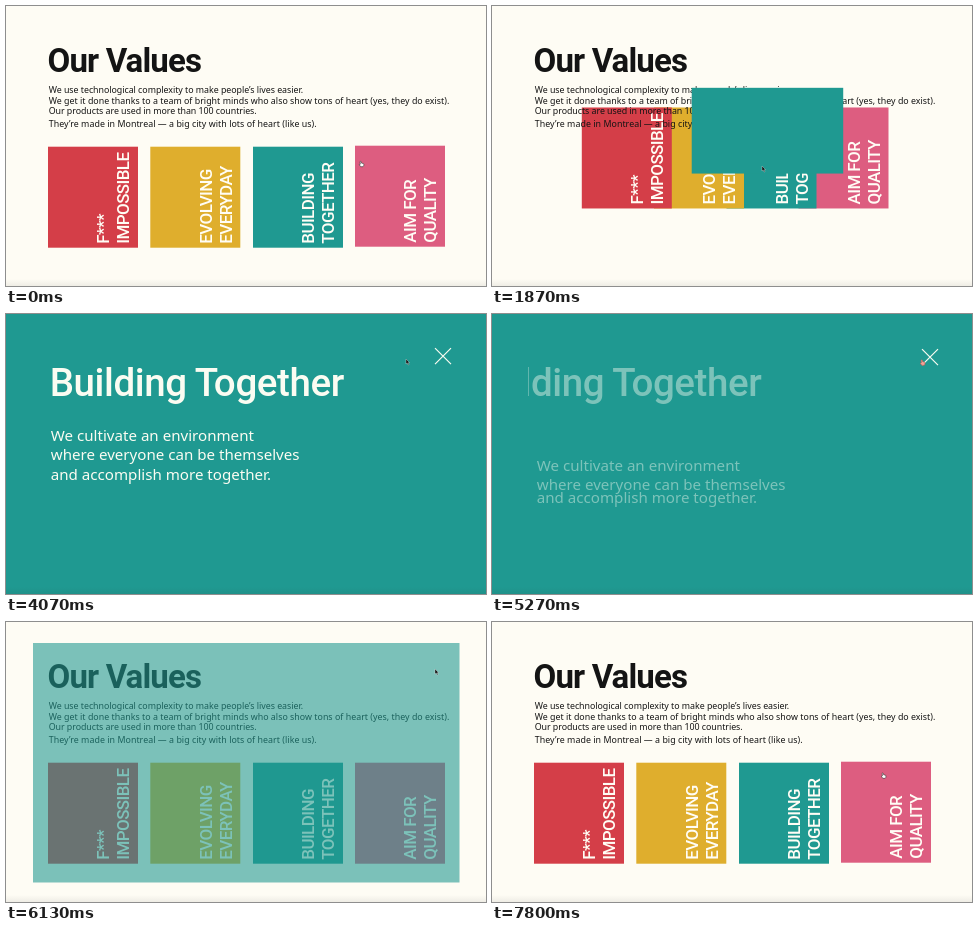
These frames come from a looping animation (480x280 px, 7870 ms). An HTML page:

```html
<!DOCTYPE html>
<html lang="en">
<head>
<meta charset="utf-8">
<title>Our Values</title>
<style>
  html, body { margin: 0; width: 100%; height: 100%; overflow: hidden; background: #fefcf4; }
  svg { display: block; width: 100%; height: 100%; }
  .head { font-family: Roboto, "Open Sans", sans-serif; font-weight: 500; }
  .body { font-family: "Noto Sans", "Open Sans", sans-serif; }
  .title { font-size: 33px; font-weight: 600; letter-spacing: -.85px; }
  .intro { font-size: 8.85px; }
  .label { font-size: 17px; letter-spacing: -.6px; fill: #fffdf5; }
  .detail { fill: #fbfcf2; }
  .detail .head { font-size: 38.5px; letter-spacing: -.4px; }
  .detail .body { font-size: 15.12px; }
</style>
</head>
<body>
<svg viewBox="0 0 480 280" id="stage">
  <defs>
    <linearGradient id="shade" x1="0" y1="0" x2="0" y2="1">
      <stop offset="0" stop-color="#222" stop-opacity="0"/>
      <stop offset="1" stop-color="#222" stop-opacity=".07"/>
    </linearGradient>
    <clipPath id="window"><rect x="36" y="30" width="420" height="220"/></clipPath>
  </defs>
  <rect width="480" height="280" fill="#fefcf4"/>
  <g id="values">
    <g id="tiles"></g>
    <g id="intro" fill="#141414">
      <text class="head title" x="41.5" y="66">Our Values</text>
    </g>
  </g>
  <rect id="pane" fill="#1f9991"/>
  <g id="detail" class="detail" clip-path="url(#window)">
    <text class="head" y="82">Building Together</text>
  </g>
  <path id="close" d="M-8-8 8 8M8-8-8 8" stroke="#fbfcf2" stroke-width="1.15" fill="none"/>
  <rect y="273" width="480" height="7" fill="url(#shade)"/>
  <path id="spinner" d="M5 4.5A6.5 6.5 0 1 1 4.5-4.7" fill="none" stroke="#12605c" stroke-width="1"/>
  <path id="arrow" d="M0 0V5L1.2 4 2.2 6 3 5.6 2.2 3.7H3.6Z" fill="#111" stroke="#eee" stroke-width=".35"/>
  <path id="hand" d="M-1.5-2.4Q-.8-3.2-.3-2.2L0-.9 2-.4Q2.6 0 2.2 1.8L1.5 2.7H-.8L-2.3.6-1.2.2Z"
        fill="#fff" stroke="#333" stroke-width=".6"/>
</svg>
<script>
const LOOP = 7870;
const $ = id => document.getElementById(id);
const clamp = x => Math.max(0, Math.min(1, x));
const ramp = (t, a, b) => clamp((t - a) / (b - a));
const mix = (a, b, p) => a + (b - a) * p;
const outSine = p => Math.sin(p * Math.PI / 2);
const smooth = p => p * p * (3 - 2 * p);

function add(parent, tag, attrs, text) {
  const el = document.createElementNS("http://www.w3.org/2000/svg", tag);
  for (const key in attrs) el.setAttribute(key, attrs[key]);
  if (text) el.textContent = text;
  parent.appendChild(el);
  return el;
}
const move = (el, x, y) => el.setAttribute("transform", `translate(${x} ${y})`);
const fade = (el, o) => el.setAttribute("opacity", o);
const show = (el, on) => el.setAttribute("visibility", on ? "visible" : "hidden");

const TILE = { y: 140.7, w: 90, h: 101 };
const tiles = [
  [42, "#d43e48", "F***", "IMPOSSIBLE"],
  [144.3, "#dfae2d", "EVOLVING", "EVERYDAY"],
  [247, "#1f9991", "BUILDING", "TOGETHER"],
  [349, "#dd5d80", "AIM FOR", "QUALITY"]
].map(([x, fill, ...words]) => {
  const el = add($("tiles"), "g", {});
  add(el, "rect", { width: TILE.w, height: TILE.h, fill });
  words.forEach((word, i) => add(el, "text",
    { class: "head label", transform: `translate(${61.3 + 20 * i} 97) rotate(-90)` }, word));
  return { x, el };
});
// Earlier tiles stack above later ones.
[...tiles].reverse().forEach(tile => $("tiles").appendChild(tile.el));

[
  [86.7, -.035, "We use technological complexity to make people’s lives easier."],
  [97.5, .018, "We get it done thanks to a team of bright minds who also show tons of heart (yes, they do exist)."],
  [108.4, -.045, "Our products are used in more than 100 countries."],
  [121.4, .04, "They’re made in Montreal — a big city with lots of heart (like us)."]
].forEach(([y, spacing, text]) =>
  add($("intro"), "text", { class: "body intro", x: 42.7, y, "letter-spacing": spacing }, text));

const heading = $("detail").querySelector("text");
const lines = [
  "We cultivate an environment",
  "where everyone can be themselves",
  "and accomplish more together."
].map(text => add($("detail"), "text", { class: "body" }, text));

// time, x, y
const pointerPath = [
  [0, 355.5, 158], [70, 353, 158], [400, 214, 178], [800, 292, 188], [1200, 285, 166],
  [1530, 271, 161], [2400, 271, 161], [2950, 262, 158], [3470, 300, 135],
  [4070, 401, 46], [4270, 404, 46], [4530, 431, 49], [6250, 430, 48],
  [6670, 215, 110], [6800, 150, 175], [7300, 300, 172], [7670, 388, 154], [7870, 393, 153.5]
];
function pointerAt(t) {
  const i = pointerPath.findIndex(p => p[0] > t);
  const [a, b] = [pointerPath[i - 1], pointerPath[i]];
  const p = smooth(ramp(t, a[0], b[0]));
  return [mix(a[1], b[1], p), mix(a[2], b[2], p)];
}

function drawTiles(t, px, py) {
  const gather = t < 5600 ? outSine(ramp(t, 1670, 2470)) : 0;
  const idle = t < 1670 || t > 6600;
  let hovered = false;
  for (const { x, el } of tiles) {
    const over = idle && px >= x && px <= x + TILE.w && py >= TILE.y && py <= TILE.y + TILE.h;
    hovered = hovered || over;
    move(el, x + .765 * (204.5 - x) * gather, TILE.y - 102 * gather - (over ? 1 : 0));
  }
  return hovered;
}

function paneBox(t) {
  if (t >= 5670) return [27, 21, 426.5, 239.5];
  if (t >= 2670) {
    const p = smooth(ramp(t, 2670, 2900));
    return [mix(60, 0, p), mix(21, 0, p), mix(394, 480, p), mix(223, 280, p)];
  }
  const s = outSine(ramp(t, 1670, 2470));
  const [w, h] = [394 * s, 223 * s];
  return [mix(287, 257, s) - w / 2, mix(119.8, 132.5, s) - h / 2, w, h];
}

function drawPane(t) {
  const [x, y, width, height] = paneBox(t);
  Object.entries({ x, y, width, height }).forEach(([k, v]) => $("pane").setAttribute(k, v));
  fade($("pane"), 1 - ramp(t, 5800, 6600));
}

function drawDetail(t) {
  const enter = ramp(t, 2900, 3500), leave = ramp(t, 5000, 5550);
  const away = Math.pow(1 - enter, 2) + Math.pow(leave, 1.5);
  move(heading, 43.7 - 198 * away, 0);
  lines.forEach((line, i) => move(line, 44.8, 127.3 + 19.1 * i + (i < 2 ? 87 : 67) * away));
  fade($("detail"), enter * clamp(1 - 1.16 * leave));
  const lift = ramp(t, 4400, 4530);
  move($("close"), 437 + lift, 42.2 + lift);
  fade($("close"), t < 5670 ? ramp(t, 2900, 3300) : 0);
}

function drawPointer(t, x, y, onTile) {
  const waiting = t >= 2400 && t < 2950;
  const onClose = t >= 4500 && t < 5670;
  const hand = onTile || onClose;
  show($("hand"), hand && !waiting);
  show($("arrow"), !hand && !waiting);
  show($("spinner"), waiting);
  $("hand").setAttribute("fill", onClose ? "#f0a59a" : "#fff");
  $("hand").setAttribute("stroke", onClose ? "#d0564d" : "#333");
  move($("hand"), x, y);
  move($("arrow"), x - 1, y - 1);
  $("spinner").setAttribute("transform", `translate(259.5 158.5) rotate(${Math.max(0, t - 2670) * .5})`);
  fade($("spinner"), .65 * (1 - ramp(t, 2750, 2950)));
}

function draw(t) {
  const [x, y] = pointerAt(t);
  const onTile = drawTiles(t, x, y);
  show($("values"), t < 2670 || t >= 5670);
  fade($("intro"), t < 5600 ? 1 - ramp(t, 1900, 2350) : 1);
  drawPane(t);
  drawDetail(t);
  drawPointer(t, x, y, onTile);
}

const start = performance.now();
function tick() {
  draw((performance.now() - start) % LOOP);
  requestAnimationFrame(tick);
}
tick();
</script>
</body>
</html>
```
